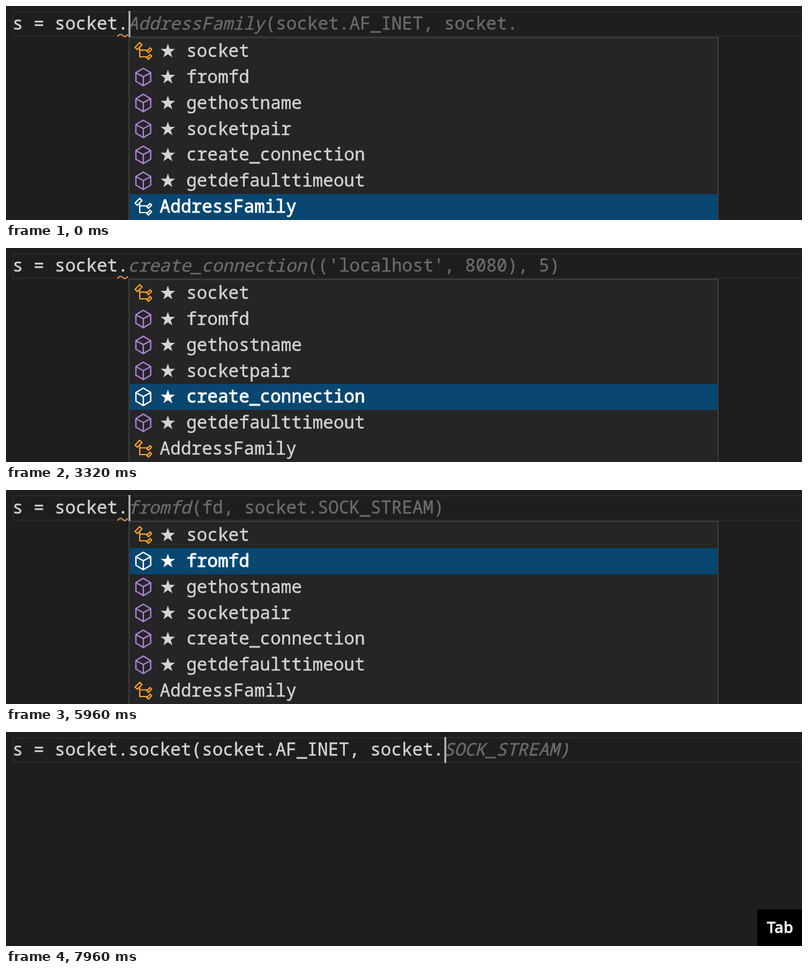
An HTML page with a canvas that plays this animation: 1280x345 px, repeating every 8 s.

```html
<!DOCTYPE html>
<html>
<head>
<meta charset="utf-8">
<style>
  html, body { margin: 0; width: 100%; height: 100%; overflow: hidden; background: #1e1e1e; }
  canvas { display: block; }
</style>
</head>
<body>
<canvas id="stage" width="1280" height="345"></canvas>
<script>
const ctx = document.getElementById('stage').getContext('2d');
const LOOP = 8000, CELL = 16.93, LEFT = 10.6, ROW = 41.84;
const MONO = '28.2px "Noto Sans Mono", "DejaVu Sans Mono", monospace';
const ORANGE = '#ee9d28', PURPLE = '#b180d7';

const items = ['socket', 'fromfd', 'gethostname', 'socketpair',
  'create_connection', 'getdefaulttimeout', 'AddressFamily'];

const classIcon = new Path2D('M5.35 1.75l1.7 1.7-3.5 3.5-1.7-1.7z' +
  'M13.03 5.6l1.2 1.2-2.4 2.4-1.2-1.2z' +
  'M13.03 10.6l1.2 1.2-2.4 2.4-1.2-1.2z' +
  'M5.35 5.5v6.85H10.9M5.35 7.35H10.9');
const cubeIcon = new Path2D('M8 1.5l5.5 3.3v6.4L8 14.5l-5.5-3.3V4.8z' +
  'M2.5 4.9L8 7.8l5.5-2.9M8 7.8v6.4');
const squiggle = new Path2D('M179 49l4-3.3h2.5l4.5 3.6h2l4-3.5');

// Each track lists [start time, value]; a value holds until the next one.
const cursorTrack = [[0, 1], [300, 0], [800, 1], [1300, 0], [1800, 1], [2320, 0],
  [2820, 1], [3320, 0], [3820, 1], [4340, 0], [4840, 1], [5240, 0], [5740, 1],
  [6260, 0], [6760, 1], [7460, 0], [7860, 1]];
const selectTrack = [[0, 6], [1200, 5], [2420, 4], [3520, 3], [4440, 2], [5240, 1],
  [6060, 0], [6960, -1]];
const keyTrack = [[0, ''], [1200, 'Up'], [1900, ''], [2420, 'Up'], [3220, ''],
  [3520, 'Up'], [4240, ''], [4440, 'Up'], [5140, ''], [5240, 'Up'], [5960, ''],
  [6060, 'Up'], [6860, ''], [6960, 'Tab'], [7660, ''], [7860, 'Tab']];
const codeTrack = [[0, 's = socket.'], [6960, 's = socket.socket'],
  [7860, 's = socket.socket(socket.AF_INET, socket.']];
// Ghost values are [italic part, upright part].
const ghostTrack = [
  [0, ['AddressFamily', '(socket.AF_INET, socket.']], [1200, ['', '']],
  [1400, ['getdefaulttimeout', '()']], [2420, ['', '']],
  [2620, ['create_connection', "(('localhost', 8080), 5)"]], [3520, ['', '']],
  [3620, ['socketpair', '()']], [4440, ['', '']],
  [4540, ['gethostname', '()']], [5240, ['', '']],
  [5440, ['fromfd', '(fd, socket.SOCK_STREAM)']], [6060, ['', '']],
  [6160, ['socket', '(socket.AF_INET, socket.']], [6960, ['', '']],
  [7060, ['(socket.AF_INET, socket.', '']], [7860, ['', '']],
  [7960, ['SOCK_STREAM)', '']]];

const at = (track, t) => track.findLast(([start]) => start <= t)[1];

function rect(x, y, w, h, color) {
  ctx.fillStyle = color;
  ctx.fillRect(x, y, w, h);
}

// A thin outline thickens the strokes of the letters by `weight` pixels.
function text(str, x, y, color, weight = 0.4, font = MONO) {
  ctx.font = font;
  ctx.fillStyle = ctx.strokeStyle = color;
  ctx.lineWidth = weight;
  ctx.lineJoin = 'round';
  ctx.fillText(str, x, y);
  ctx.strokeText(str, x, y);
}

function icon(path, y, color) {
  ctx.save();
  ctx.translate(203.5, y - 17.2);
  ctx.scale(2.16, 2.16);
  ctx.strokeStyle = color;
  ctx.lineWidth = 1;
  ctx.lineJoin = 'round';
  ctx.stroke(path);
  ctx.restore();
}

function star(x, y, color) {
  ctx.beginPath();
  for (let i = 0; i < 10; i++) {
    const r = i % 2 ? 4.8 : 12.2, a = i * Math.PI / 5;
    ctx.lineTo(x + r * Math.sin(a), y - r * Math.cos(a));
  }
  ctx.fillStyle = color;
  ctx.fill();
}

function popup(selected) {
  rect(197, 50, 949, 295, '#454545');
  rect(198.5, 51.5, 946, 294, '#252526');
  items.forEach((name, i) => {
    const on = i === selected, last = i === 6, isClass = i === 0 || last;
    const top = Math.round(52 + ROW * i), bottom = Math.round(52 + ROW * (i + 1));
    const mid = 72.5 + ROW * i, color = on ? '#ffffff' : '#d4d4d4';
    if (on) rect(199, top, 945, bottom - top, '#094771');
    icon(isClass ? classIcon : cubeIcon, mid, on ? color : isClass ? ORANGE : PURPLE);
    if (!last) star(260.3, mid + 0.5, color);
    text(name, last ? 247.3 : 289.9, mid + 9.5, color, on ? 0.9 : 0.4);
  });
}

function codeLine(t) {
  const code = at(codeTrack, t), [slanted, upright] = at(ghostTrack, t);
  const end = LEFT + code.length * CELL;
  ctx.strokeStyle = '#282828';
  ctx.lineWidth = 2.4;
  ctx.strokeRect(11.2, 9.2, 1300, 39.6);
  text(code, LEFT, 38, '#d4d4d4');
  text(slanted, end - 1, 38, '#6b6b6b', 0.4, 'italic ' + MONO);
  text(upright, end + slanted.length * CELL, 38, '#6b6b6b');
  if (t < 7260) {
    ctx.strokeStyle = '#d8934a';
    ctx.lineWidth = 2;
    ctx.stroke(squiggle);
  }
  return end;
}

function badge(key) {
  const up = key === 'Up', x = up ? 1218 : 1208;
  rect(x, 286, 1280 - x, 59, '#000000');
  text(key, up ? 1230 : 1223.5, up ? 321.5 : 324, '#ffffff', 0.4,
    '600 25px "Open Sans", "Noto Sans", sans-serif');
}

function draw(now) {
  const t = now % LOOP, selected = at(selectTrack, t), key = at(keyTrack, t);
  rect(0, 0, 1280, 345, '#1e1e1e');
  const end = codeLine(t);
  if (selected >= 0) popup(selected);
  if (at(cursorTrack, t)) rect(end + 0.1, 8, 3.2, 42, '#aeafad');
  if (key) badge(key);
  requestAnimationFrame(draw);
}
requestAnimationFrame(draw);
</script>
</body>
</html>
```
